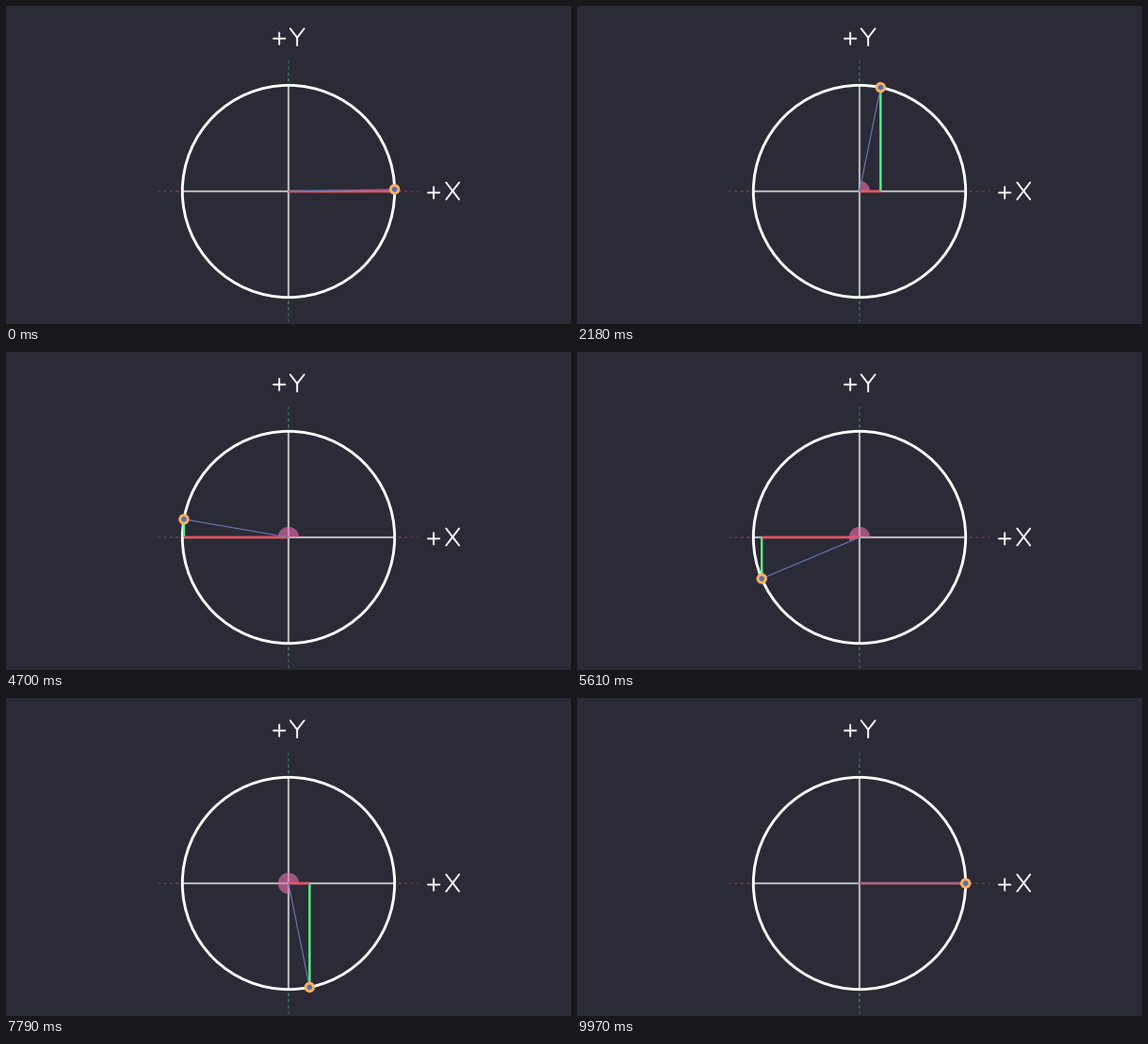
Recreate the animation shown at these times as a matplotlib script. Size 600 px wide and 338 px high, loop 10000 ms.

```python
import numpy as np
import matplotlib.pyplot as plt
from matplotlib.animation import FuncAnimation
from matplotlib.patches import Circle, Wedge

W, H, DPI = 600, 338, 100
FRAMES, LOOP_MS = 330, 10000
CX, CY, R = 300, 197, 112.7

BG = "#2b2a37"
AXIS = "#b3b3b3"
RED, GREEN, BLUE = "#f2525f", "#57f287", "#6575b3"
PINK, ORANGE, DOT = "#ee6fb4", "#fbb061", "#566fae"

fig = plt.figure(figsize=(W / DPI, H / DPI), dpi=DPI, facecolor=BG)
ax = fig.add_axes([0, 0, 1, 1])
ax.set_xlim(0, W)
ax.set_ylim(H, 0)
ax.axis("off")


def stroke(xs, ys, color, width, z, cap="butt", alpha=1):
    """Polyline with its width in pixels."""
    line, = ax.plot(xs, ys, color=color, lw=width * 72 / DPI, zorder=z,
                    alpha=alpha, solid_capstyle=cap, solid_joinstyle="round",
                    snap=False)
    return line


def plus(x, y, half=6.2):
    stroke([x - half, x + half], [y, y], "white", 1.9, 2, "round")
    stroke([x, x], [y - half, y + half], "white", 1.9, 2, "round")


# Fading dashes beyond the circle
for k in range(4):
    near = R + 4 + 6.4 * k
    far = near + 3.2
    fade = 0.36 - 0.06 * k
    for side in (-1, 1):
        stroke([CX + side * near, CX + side * far], [CY, CY],
               RED, 2, 1, alpha=fade)
        stroke([CX, CX], [CY + side * near, CY + side * far],
               GREEN, 2, 1, alpha=fade)

# Axes and unit circle
stroke([CX - R, CX + R], [CY, CY], AXIS, 2.2, 2)
stroke([CX, CX], [CY - R, CY + R], AXIS, 2.2, 2)
ax.add_patch(Circle((CX, CY), R, fill=False, ec="white",
                    lw=2.9 * 72 / DPI, zorder=3))

# Labels
plus(290.2, 34.6)
stroke([301.8, 309.2, 316.6], [24, 33.6, 24], "white", 1.9, 2, "round")
stroke([309.2, 309.2], [33.6, 42], "white", 1.9, 2, "round")
plus(454.2, 198.4)
stroke([467.4, 481.2], [187.6, 205.6], "white", 1.9, 2, "round")
stroke([481.2, 467.4], [187.6, 205.6], "white", 1.9, 2, "round")

# Moving parts
wedge = ax.add_patch(Wedge((CX, CY), 11.2, 0, 0, color=PINK, lw=0,
                           alpha=0.6, zorder=4))
sine = stroke([], [], GREEN, 2.4, 5)
cosine = stroke([], [], RED, 2.6, 6)
radius = stroke([], [], BLUE, 1.2, 7)
ring = ax.add_patch(Circle((CX, CY), 5.7, color=ORANGE, lw=0, zorder=8))
core = ax.add_patch(Circle((CX, CY), 2.8, color=DOT, lw=0, zorder=9))


def update(i):
    angle = 360 * ((i + 1) % FRAMES) / FRAMES
    t = np.radians(angle)
    x, y = CX + R * np.cos(t), CY - R * np.sin(t)
    wedge.set_visible(angle > 0)
    wedge.set_theta1(-angle)
    wedge.set_theta2(0)
    sine.set_data([x, x], [CY, y])
    cosine.set_data([CX, x], [CY, CY])
    radius.set_data([CX, x], [CY, y])
    ring.center = core.center = (x, y)
    return wedge, sine, cosine, radius, ring, core


anim = FuncAnimation(fig, update, frames=FRAMES, interval=LOOP_MS / FRAMES,
                     repeat=True, repeat_delay=0, blit=False)
plt.show()
```
